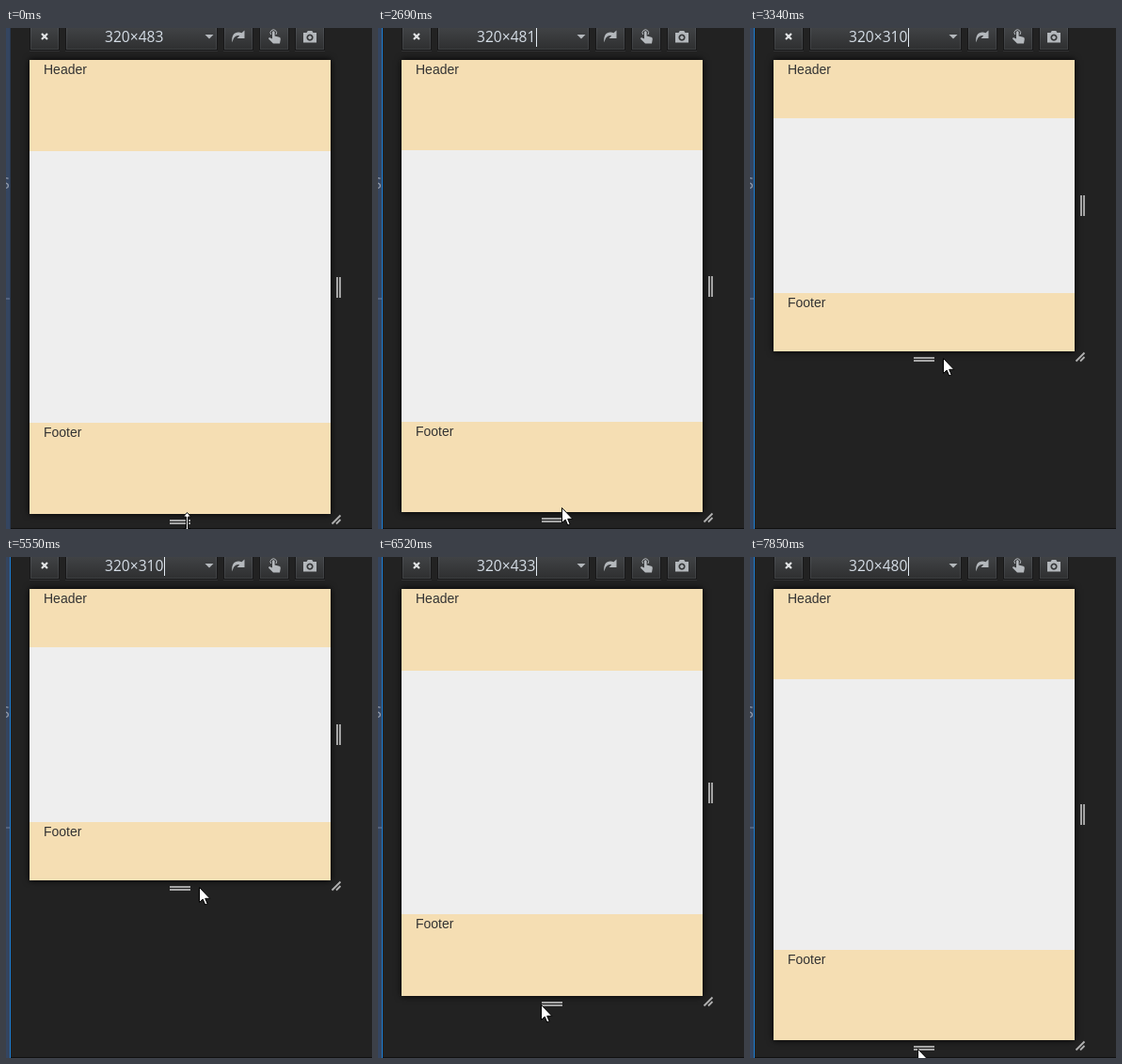
These frames come from a looping animation (389x533 px, 8000 ms). An HTML page:

```html
<!DOCTYPE html>
<html lang="en">
<head>
<meta charset="utf-8">
<title>Responsive view</title>
<style>
  html, body { margin: 0; width: 100%; height: 100%; overflow: hidden; background: #222; }
  #stage { position: absolute; inset: 0; width: 389px; height: 533px; overflow: hidden; background: #222; }
  #stage div, #stage svg { position: absolute; }
  .strip { left: 0; top: 0; width: 4px; height: 533px; overflow: hidden; background: #344560; }
  .strip span { position: absolute; left: -5px; top: 154px; font: 16px/22px "Open Sans", sans-serif; color: #929bab; }
  .strip i { position: absolute; left: 0; top: 287px; width: 4px; height: 2px; background: #52627e; }
  #edge { left: 4px; top: 0; width: 1px; height: 533px; background: #29384f; }
  #edge.focus { background: #1c7cd0; }
  .floor { left: 5px; top: 532px; width: 384px; height: 1px; background: #101010; }
  .button {
    box-sizing: border-box; top: -2px; height: 26px;
    border: 1px solid hsla(210, 8%, 5%, .45);
    background: linear-gradient(hsla(212, 7%, 57%, .3), hsla(212, 7%, 57%, .12)) padding-box;
    box-shadow: inset 0 0 0 1px hsla(210, 16%, 76%, .1), 0 1px hsla(210, 16%, 76%, .1);
  }
  #size { left: 105px; top: -2px; font: 15.6px/22px "Open Sans", "Noto Sans", sans-serif; color: #d5dde6; white-space: nowrap; }
  #caret { left: 168px; top: 0; width: 1px; height: 20px; background: #e4ebf2; }
  #panel { left: 25px; top: 34px; width: 320px; background: #eee; box-shadow: 0 0 7px #000; font: 14px/20px "Liberation Sans", Arial, sans-serif; color: #333; }
  .band { box-sizing: border-box; left: 0; width: 320px; height: 20%; padding-left: 15px; background: #f5deb3; }
  svg { left: 0; top: 0; }
</style>
</head>
<body>
<div id="stage">
  <div class="strip"><span>S</span><i></i></div>
  <div id="edge"></div>
  <div class="floor"></div>
  <div class="button" style="left:25px;width:32px"></div>
  <div class="button" style="left:63px;width:162px"></div>
  <div class="button" style="left:231px;width:32px"></div>
  <div class="button" style="left:269px;width:32px"></div>
  <div class="button" style="left:307px;width:32px"></div>
  <div id="size"></div>
  <div id="caret"></div>
  <div id="panel">
    <div class="band" style="top:0">Header</div>
    <div class="band" style="top:80%">Footer</div>
  </div>
  <svg width="389" height="533" viewBox="0 0 389 533">
    <g fill="#b4b8bc">
      <path d="M38 6l6 6m0-6l-6 6" stroke="#e4e6e8" stroke-width="2.2" fill="none"/>
      <path d="M211.500 7h9l-4.500 4.500z"/>
      <path d="M240.500 15.500C239 7 244 3 250.500 5.200L253.500 2.500V11H245.500L248.200 8.200C244.500 7 241.500 10 240.500 15.500Z"/>
      <path d="M283 4.500a1.300 1.300 0 0 1 2.600 0V8.500L290.500 9.700Q292 10.200 291.800 12L291 16.500H284L279 11.500Q279 10 280.500 10.300L283 11.500Z"/>
      <path d="M281.600 7a3.300 3.300 0 1 1 5.400 0" fill="none" stroke="#b4b8bc"/>
      <path fill-rule="evenodd" d="M316 5h3.500l1.300-2h4.400l1.300 2h3.500v10.500h-14zM323 6.500a3.600 3.600 0 1 0 .01 0zM323 8.200a1.900 1.900 0 1 1-.01 0z"/>
    </g>
    <path id="side" d="M351 -11h2v22h-2zM354 -11h2v22h-2z" fill="#a5a5a5"/>
    <g id="foot">
      <path d="M174 6h22v2h-22zM174 9h22v2h-22z" fill="#a5a5a5"/>
      <path d="M346.500 10.500l9-9M351 10.500l4.500-4.500" stroke="#b0b0b0" stroke-width="1.800"/>
    </g>
    <g fill="#fff" stroke="#000" stroke-linejoin="round">
      <path id="arrow" d="M.5 .5V16.500L4.200 13L6.700 19L9.200 18L6.700 12.300H11.800Z"/>
      <path id="resize" d="M4.500 .5L8.500 5H5.500V17.500H8.500L4.500 22L.5 17.500H3.500V5H.5Z"/>
    </g>
  </svg>
</div>
<script>
const LOOP = 8000;
const FOCUS_AT = 2570;
const CARET_OFF = [[3870, 4430], [4960, 5550]];

// [start ms, viewport height, cursor x, cursor y, resize cursor?]
const steps = [
  [0, 483, 188, 515, 1], [150, 483, 176, 512, 1], [400, 483, 176, 511, 1],
  [1120, 483, 180, 521], [1830, 483, 181, 522],
  [1990, 483, 179, 513, 1], [2140, 483, 180, 513, 1],
  [2570, 483, 187, 520], [2690, 481, 195, 510], [2810, 445, 201, 472],
  [2930, 400, 203, 425], [3080, 358, 204, 385], [3200, 328, 205, 361], [3340, 310, 205, 351],
  [5700, 312, 203, 355], [5820, 326, 199, 373], [5940, 350, 194, 401],
  [6100, 377, 188, 428], [6220, 398, 183, 450], [6370, 419, 177, 465],
  [6520, 433, 173, 476], [6640, 440, 173, 483], [6790, 446, 174, 488],
  [6910, 452, 174, 494], [7040, 458, 175, 500], [7160, 464, 175, 507],
  [7300, 469, 176, 511], [7430, 474, 176, 514], [7580, 474, 176, 518],
  [7730, 478, 177, 521], [7850, 480, 178, 523]
];

const el = id => document.getElementById(id);
const [edge, size, caret, panel, side, foot, arrow, resize] =
  ["edge", "size", "caret", "panel", "side", "foot", "arrow", "resize"].map(el);
const move = (node, x, y) => node.setAttribute("transform", `translate(${x} ${y})`);
const show = (node, on) => { node.style.visibility = on ? "visible" : "hidden"; };

function draw(time) {
  const [, height, x, y, resizing] = steps.findLast(step => step[0] <= time);
  const focused = time >= FOCUS_AT;
  size.textContent = `320×${height}`;
  panel.style.height = `${height}px`;
  move(side, 0, Math.round(34 + height / 2));
  move(foot, 0, 34 + height);
  move(arrow, x, y);
  move(resize, x, y);
  show(arrow, !resizing);
  show(resize, resizing);
  edge.classList.toggle("focus", focused);
  show(caret, focused && !CARET_OFF.some(([from, to]) => time >= from && time < to));
}

const start = performance.now();
function tick() {
  draw((performance.now() - start) % LOOP);
  requestAnimationFrame(tick);
}
tick();
</script>
</body>
</html>
```
